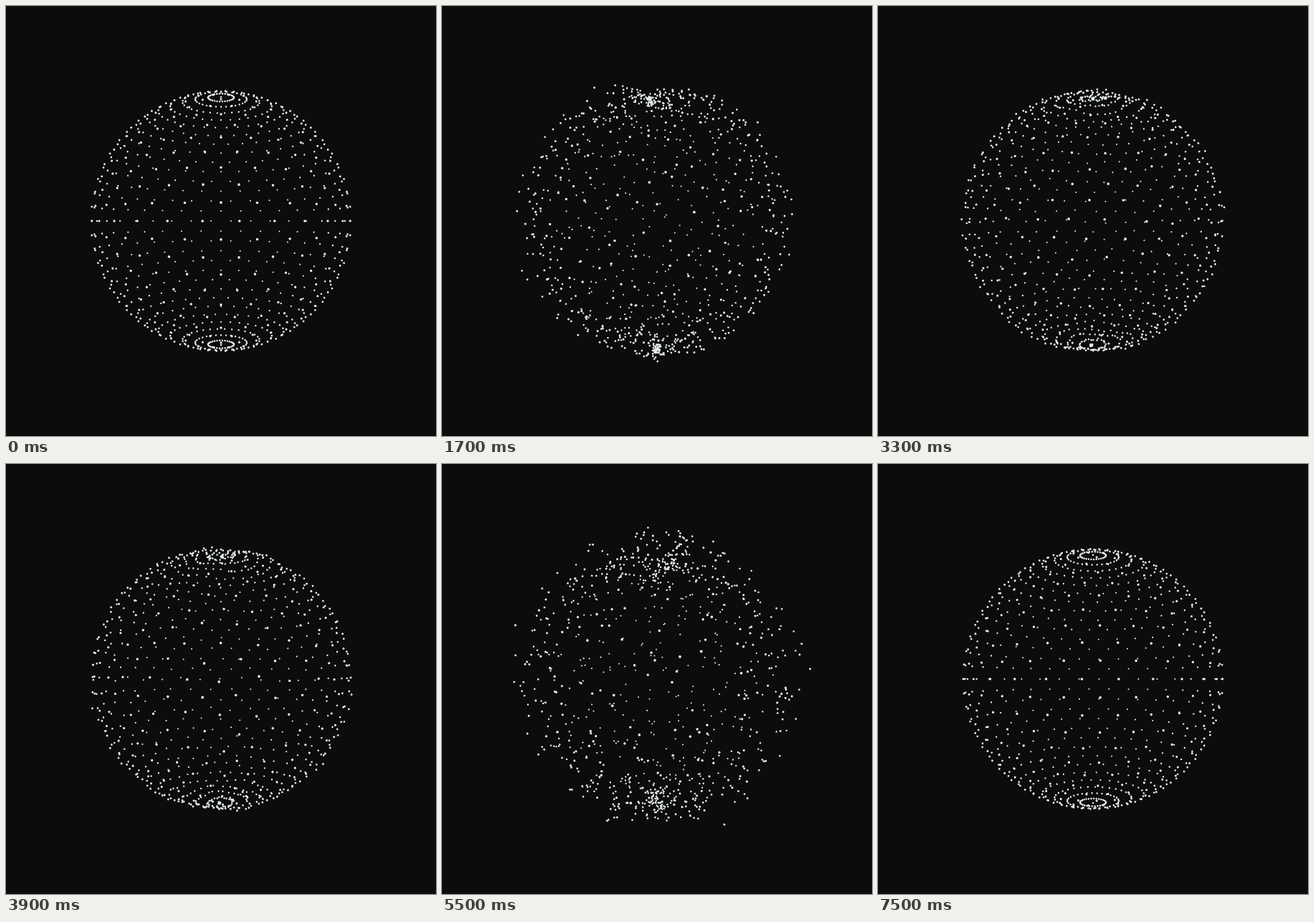
Write an HTML page with a canvas that moves like this. It is 600 px wide and 600 px high and loops after 7550 ms.

```html
<!DOCTYPE html>
<html lang="en">
<head>
<meta charset="utf-8">
<title>Particle sphere</title>
<style>
html, body { margin: 0; height: 100%; overflow: hidden; background: #0c0c0c; }
canvas { display: block; }
</style>
</head>
<body>
<canvas id="stage" width="600" height="600"></canvas>
<script>
const ctx = document.getElementById('stage').getContext('2d');
const LOOP = 7550, STEP = 50;
const RADIUS = 173, CAMERA = RADIUS / 0.3, ROWS = 30, COLS = 30;
const DOT = 1.3;

// Scatter strength in px: [time in ms, strength]
const SCATTER = [
  [0, 0], [250, 32], [550, 52], [850, 43], [950, 38], [1650, 17], [2450, 10],
  [3300, 4], [3900, 4], [4000, 8], [4250, 34], [4500, 56], [4850, 49],
  [5650, 28], [6500, 10], [7250, 1], [7500, 0], [LOOP, 0]
];

let seed = 20417;
function random() {
  seed = (seed * 1664525 + 1013904223) % 4294967296;
  return seed / 4294967296;
}
const spread = () => random() * 2 - 1;

// Smooth drift shared by neighbours, so that scattered points clump
function field(x, y, z, phase) {
  return 0.5 * Math.sin(0.075 * x + 0.043 * y - 0.051 * z + phase)
       + 0.5 * Math.sin(0.062 * z - 0.081 * y + 0.037 * x + 2.3 * phase);
}
const shift = (x, y, z, phase) => 0.7 * field(x, y, z, phase) + 0.35 * spread();

// Latitude rings, each turned half a step against the one above
const points = [];
for (let row = 0; row <= ROWS; row++) {
  const polar = Math.PI * row / ROWS;
  for (let col = 0; col < COLS; col++) {
    const angle = 2 * Math.PI * (col + row / 2) / COLS;
    const x = RADIUS * Math.sin(polar) * Math.sin(angle);
    const y = -RADIUS * Math.cos(polar);
    const z = RADIUS * Math.sin(polar) * Math.cos(angle);
    points.push({
      x, y, z,
      dx: shift(x, y, z, 1), dy: shift(y, z, x, 3), dz: shift(z, x, y, 5)
    });
  }
}

function scatterAt(t) {
  const i = SCATTER.findIndex(key => key[0] > t);
  const [t0, a] = SCATTER[i - 1], [t1, b] = SCATTER[i];
  return a + (b - a) * (t - t0) / (t1 - t0);
}

function draw(t) {
  const turn = -2 * Math.PI * t / LOOP;
  const amount = scatterAt(t);
  const cos = Math.cos(turn), sin = Math.sin(turn);
  ctx.fillStyle = '#0c0c0c';
  ctx.fillRect(0, 0, 600, 600);
  ctx.fillStyle = '#e4ebe9';
  ctx.beginPath();
  for (const p of points) {
    const x0 = p.x + p.dx * amount;
    const z0 = p.z + p.dz * amount;
    const x = x0 * cos + z0 * sin;
    const z = z0 * cos - x0 * sin;
    const scale = CAMERA / (CAMERA - z);
    const px = 300 + x * scale;
    const py = 300 + (p.y + p.dy * amount) * scale;
    const r = DOT * scale;
    ctx.moveTo(px + r, py);
    ctx.arc(px, py, r, 0, 2 * Math.PI);
  }
  ctx.fill();
}

const start = performance.now();
function frame() {
  const t = (performance.now() - start) % LOOP;
  draw(Math.floor(t / STEP) * STEP);
  requestAnimationFrame(frame);
}
frame();
</script>
</body>
</html>
```
